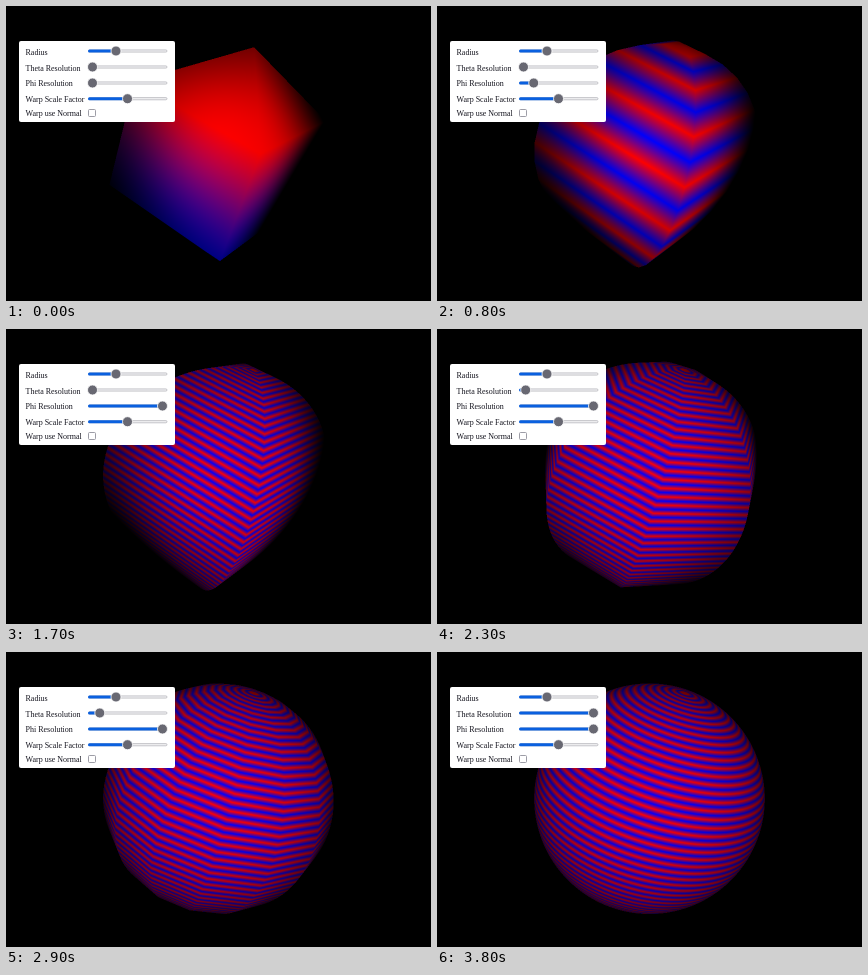
An HTML page with a canvas that plays this animation: 425 px wide and 295 px high, repeating every 4.1 s.

```html
<!DOCTYPE html>
<html lang="en">
<head>
<meta charset="utf-8">
<title>Sphere resolution</title>
<style>
  html, body { margin: 0; width: 100%; height: 100%; overflow: hidden; background: #000; }
  canvas, svg { position: absolute; left: 0; top: 0; width: 425px; height: 295px; }
  text { font: 8px "Liberation Serif", "Noto Serif", serif; fill: #15151f; }
</style>
</head>
<body>
<canvas width="425" height="295"></canvas>
<svg viewBox="0 0 425 295">
  <rect x="13" y="35" width="156" height="81" rx="2" fill="#fff"/>
  <g id="sliders"></g>
  <text x="19.5" y="110">Warp use Normal</text>
  <rect x="82.5" y="103.5" width="7" height="7" rx="1" fill="#fff" stroke="#92929c" stroke-width=".9"/>
</svg>
<script>
const W = 425, H = 295, LOOP = 4100, FIRST = 500, STEP = 300;

// [theta resolution, phi resolution] for every step of the loop
const STATES = [
  [4, 4], [4, 7], [4, 18], [4, 38], [4, 70], [4, 100], [5, 100],
  [7, 100], [8, 100], [14, 100], [23, 100], [60, 100], [100, 100]
];

// ---- sliders ----
const SVG = 'http://www.w3.org/2000/svg';
const group = document.getElementById('sliders');
function add(tag, attrs) {
  const el = group.appendChild(document.createElementNS(SVG, tag));
  for (const key in attrs) el.setAttribute(key, attrs[key]);
  return el;
}
function slider(label, baseline, y) {
  add('text', { x: 19.5, y: baseline }).textContent = label;
  add('rect', { x: 82.5, y: y - 1.1, width: 78.5, height: 2.2, rx: 1.1,
    fill: '#f0f0f2', stroke: '#b0b0b6', 'stroke-width': .7 });
  const fill = add('rect', { x: 82, y: y - 1.5, height: 3, rx: 1.5, fill: '#0a60df' });
  const knob = add('circle', { cy: y, r: 5, fill: '#686872', stroke: '#fff', 'stroke-width': .8 });
  return x => {
    fill.setAttribute('width', x - 82);
    knob.setAttribute('cx', x);
  };
}
slider('Radius', 48.5, 45)(110);
const setTheta = slider('Theta Resolution', 64.5, 61);
const setPhi = slider('Phi Resolution', 80, 77);
slider('Warp Scale Factor', 96, 92.7)(121.5);
const knobX = value => 86.5 + (value - 4) * .729;

// ---- sphere, in view space: x right, y down, z toward the eye ----
const EYE = 4.87, FOCAL = 550, CX = 212.5, CY = 146.7, SS = 2;
const NORTH = [.287, -.85, .44], FRONT = [.179, .5, .848], RIGHT = [.941, .165, -.296];

const dot = (a, b) => a[0] * b[0] + a[1] * b[1] + a[2] * b[2];
const cross = (a, b) => [
  a[1] * b[2] - a[2] * b[1], a[2] * b[0] - a[0] * b[2], a[0] * b[1] - a[1] * b[0]
];

function spherePoint(theta, phi) {
  const c = Math.cos(phi), s = Math.sin(phi);
  const r = s * Math.cos(theta), f = -s * Math.sin(theta);
  return NORTH.map((n, k) => c * n + r * RIGHT[k] + f * FRONT[k]);
}

function buildMesh(thetaRes, phiRes) {
  const rings = phiRes - 2, triangles = [];
  const points = [spherePoint(0, 0), spherePoint(0, Math.PI)];
  for (let i = 0; i < thetaRes; i++)
    for (let j = 1; j <= rings; j++)
      points.push(spherePoint(2 * Math.PI * i / thetaRes, Math.PI * j / (phiRes - 1)));
  for (let i = 0; i < thetaRes; i++) {
    const a = 2 + i * rings, b = 2 + (i + 1) % thetaRes * rings;
    triangles.push([0, a, b], [1, b + rings - 1, a + rings - 1]);
    for (let j = 0; j < rings - 1; j++)
      triangles.push([a + j, a + j + 1, b + j + 1], [a + j, b + j + 1, b + j]);
  }
  return { points, triangles };
}

function renderSphere(thetaRes, phiRes) {
  const { points, triangles } = buildMesh(thetaRes, phiRes);
  const layer = document.createElement('canvas');
  layer.width = W * SS;
  layer.height = H * SS;
  const ctx = layer.getContext('2d');
  const image = ctx.createImageData(layer.width, layer.height), px = image.data;

  const rays = points.map(p => [p[0], p[1], p[2] - EYE]);
  const screen = points.map(p => {
    const k = FOCAL / (EYE - p[2]);
    return [(CX + p[0] * k) * SS, (CY + p[1] * k) * SS];
  });

  for (const ids of triangles) {
    const [a, b, c] = ids.map(i => rays[i]);
    const [p, q, r] = ids.map(i => points[i]);
    const bc = cross(b, c), ca = cross(c, a), ab = cross(a, b);
    const volume = dot(a, bc);
    if (volume * dot(p, cross(q, r)) >= 0) continue;   // faces away

    const xs = ids.map(i => screen[i][0]), ys = ids.map(i => screen[i][1]);
    const x0 = Math.floor(Math.min(...xs)), x1 = Math.ceil(Math.max(...xs));
    const y0 = Math.floor(Math.min(...ys)), y1 = Math.ceil(Math.max(...ys));
    const [sa, sb, sc] = ids.map(i => i % 2);
    for (let y = y0; y <= y1; y++) for (let x = x0; x <= x1; x++) {
      const ray = [((x + .5) / SS - CX) / FOCAL, ((y + .5) / SS - CY) / FOCAL, -1];
      let u = dot(ray, bc) / volume, v = dot(ray, ca) / volume, w = dot(ray, ab) / volume;
      if (u < -1e-9 || v < -1e-9 || w < -1e-9) continue;
      const sum = u + v + w;
      u /= sum; v /= sum; w /= sum;
      const n = [0, 1, 2].map(k => u * p[k] + v * q[k] + w * r[k]);
      const light = 255 * Math.max(0, n[2] / Math.sqrt(dot(n, n)));
      const blue = u * sa + v * sb + w * sc;
      const o = 4 * (y * layer.width + x);
      px[o] = light * (1 - blue);
      px[o + 2] = light * blue;
      px[o + 3] = 255;
    }
  }
  ctx.putImageData(image, 0, 0);
  return layer;
}

// ---- playback ----
const stage = document.querySelector('canvas').getContext('2d');
const cache = [];
let shown = -1;

function draw() {
  const t = performance.now() % LOOP;
  const index = t < FIRST ? 0 : Math.min(STATES.length - 1, 1 + Math.floor((t - FIRST) / STEP));
  if (index !== shown) {
    shown = index;
    const [theta, phi] = STATES[index];
    cache[index] = cache[index] || renderSphere(theta, phi);
    stage.fillStyle = '#000';
    stage.fillRect(0, 0, W, H);
    stage.drawImage(cache[index], 0, 0, W, H);
    setTheta(knobX(theta));
    setPhi(knobX(phi));
  }
  requestAnimationFrame(draw);
}
draw();
</script>
</body>
</html>
```
